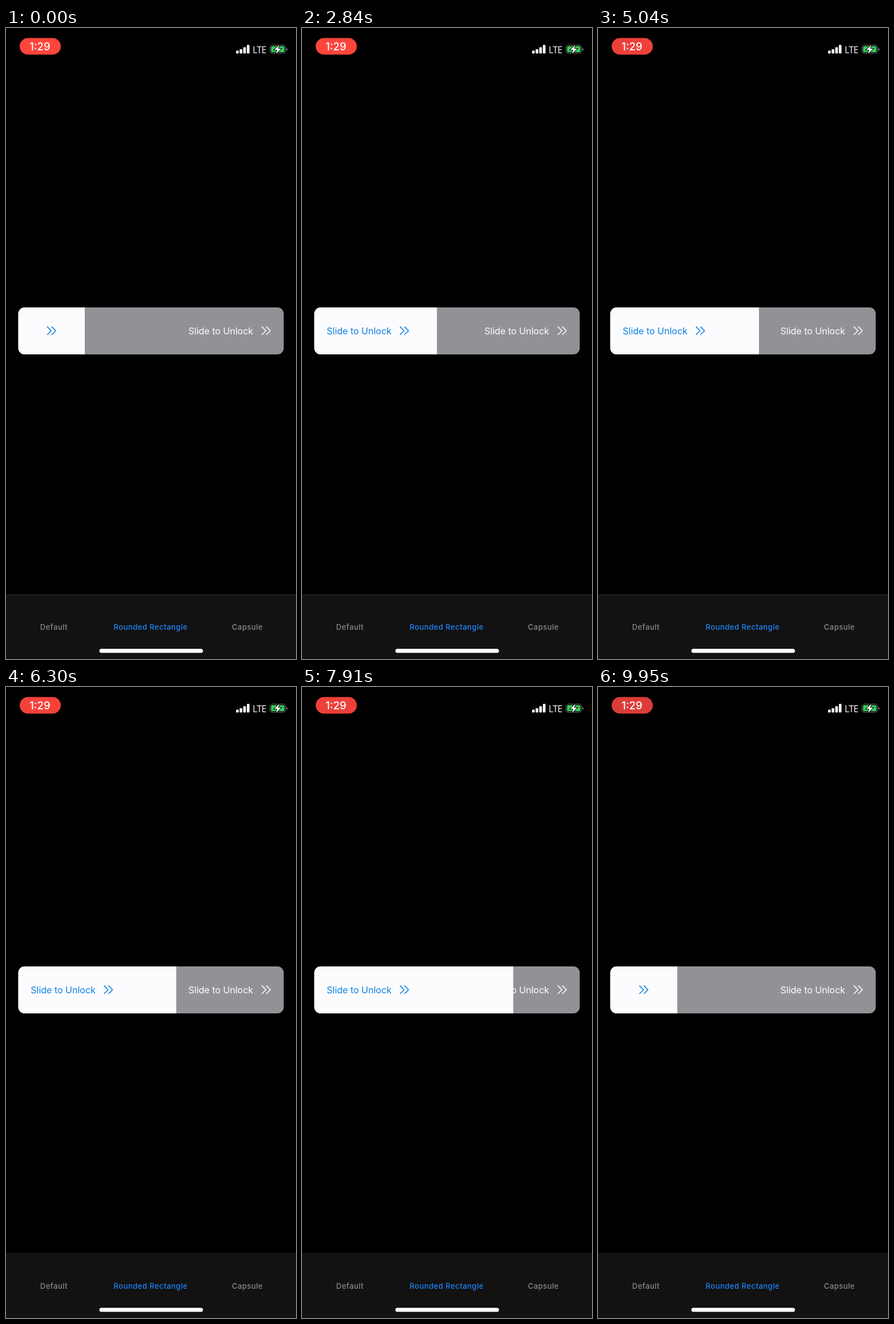
An HTML page for the animation above (10000 ms loop, 508 by 1102 pixels).

```html
<!DOCTYPE html>
<html lang="en">
<head>
<meta charset="utf-8">
<title>Slide to Unlock</title>
<style>
  html, body { margin: 0; width: 100%; height: 100%; overflow: hidden; background: #000; }
  svg { display: block; width: 100vw; height: 100vh; }
  text { font-family: Inter, Roboto, sans-serif; white-space: pre; }
  .label { font-size: 16px; }
  .tab { font-size: 13px; font-weight: 500; letter-spacing: .5px; fill: #8a898d; }
  .chevron { fill: none; stroke-width: 1.6; stroke-linecap: round; stroke-linejoin: round; }
</style>
</head>
<body>
<svg viewBox="0 0 508 1102">
  <defs>
    <clipPath id="round"><rect x="21.5" y="488" width="465" height="82" rx="11"/></clipPath>
    <path id="arrows" class="chevron" d="M-7 -6.8L-.2 0L-7 6.8M.8 -6.8L7.6 0L.8 6.8"/>
  </defs>
  <rect width="508" height="1102" fill="#000"/>

  <!-- status bar -->
  <rect id="pill" x="24" y="17.5" width="72" height="29" rx="14.5"/>
  <text x="59.5" y="39" font-size="18.5" font-weight="500" text-anchor="middle" fill="#fff">1:29</text>
  <g fill="#fff">
    <rect x="403" y="39.5" width="4.6" height="5" rx="1.3"/>
    <rect x="409.3" y="37" width="4.6" height="7.5" rx="1.3"/>
    <rect x="415.6" y="33.5" width="4.6" height="11" rx="1.3"/>
    <rect x="421.9" y="29.5" width="4.6" height="15" rx="1.3"/>
    <text x="432" y="43.5" font-size="16" letter-spacing="-.7" style="font-family:'Open Sans',sans-serif">LTE</text>
  </g>
  <rect x="462.5" y="29.9" width="27" height="14.2" rx="4" fill="none" stroke="#77777b"/>
  <rect x="464.3" y="31.7" width="23.4" height="10.6" rx="2.6" fill="#37d158"/>
  <path d="M491 35.2a2.2 2.2 0 0 1 0 4.4z" fill="#77777b"/>
  <path d="M478.8 29.2L469.8 38.2H475.2L473 45.2L482 36H476.6Z" fill="#fff" stroke="#000" stroke-width="2" paint-order="stroke"/>

  <!-- slider -->
  <g clip-path="url(#round)">
    <rect x="21" y="487" width="467" height="84" fill="#929196"/>
    <text class="label" x="319.5" y="534.5" fill="#fff">Slide to Unlock</text>
    <use href="#arrows" x="455.5" y="528.7" stroke="#fff"/>
    <rect id="thumb" x="21" y="487" height="84" fill="#fcfcfe"/>
    <text id="label" class="label" x="43.3" y="534.5" fill="#0b80e2">Slide to Unlock</text>
    <use id="mark" href="#arrows" y="528.7" stroke="#0b80e2"/>
  </g>

  <!-- tab bar -->
  <rect y="989" width="508" height="113" fill="#131111"/>
  <rect y="989" width="508" height="1" fill="#252424"/>
  <text class="tab" x="59.8" y="1050.5">Default</text>
  <text class="tab" x="188.6" y="1050.5" style="fill:#1a87fb">Rounded Rectangle</text>
  <text class="tab" x="395.8" y="1050.5">Capsule</text>
  <rect x="163.5" y="1084.3" width="181.5" height="7" rx="3.5" fill="#fff"/>
</svg>
<script>
const LOOP = 10000, REST = 138, FULL = 487, LABEL_MIN = 211;
const PULSE = 2880, STIFFNESS = 0.012;

// Each drag: start, end of the pull, release, furthest edge
const drags = [
  [20, 650, 777, FULL],
  [1700, 2690, 2728, 300],
  [4200, 6105, 6150, FULL],
  [7140, 8400, 9260, FULL]
];

const el = id => document.getElementById(id);
const pill = el('pill'), thumb = el('thumb'), label = el('label'), mark = el('mark');
const mix = (a, b, k) => a + (b - a) * k;
const smooth = k => k * k * (3 - 2 * k);

// Follow the finger, then spring back with critical damping
function edgeAt(t) {
  const drag = drags.filter(d => t >= d[0]).pop();
  if (!drag) return REST;
  const [start, end, release, peak] = drag;
  if (t < release) return mix(REST, peak, smooth(Math.min(1, (t - start) / (end - start))));
  const s = STIFFNESS * (t - release);
  return mix(REST, peak, (1 + s) * Math.exp(-s));
}

function draw(t) {
  const edge = edgeAt(t);
  const open = edge >= LABEL_MIN;
  thumb.setAttribute('width', edge - 21);
  label.setAttribute('visibility', open ? 'visible' : 'hidden');
  mark.setAttribute('x', open ? 179 : (edge + 21) / 2);

  const dim = (1 - Math.cos(2 * Math.PI * t / PULSE)) / 2;
  const rgb = [mix(255, 219, dim), mix(69, 60, dim), mix(60, 55, dim)].map(Math.round);
  pill.setAttribute('fill', `rgb(${rgb})`);
}

const begin = performance.now();
function tick() {
  draw((performance.now() - begin) % LOOP);
  requestAnimationFrame(tick);
}
tick();
</script>
</body>
</html>
```
